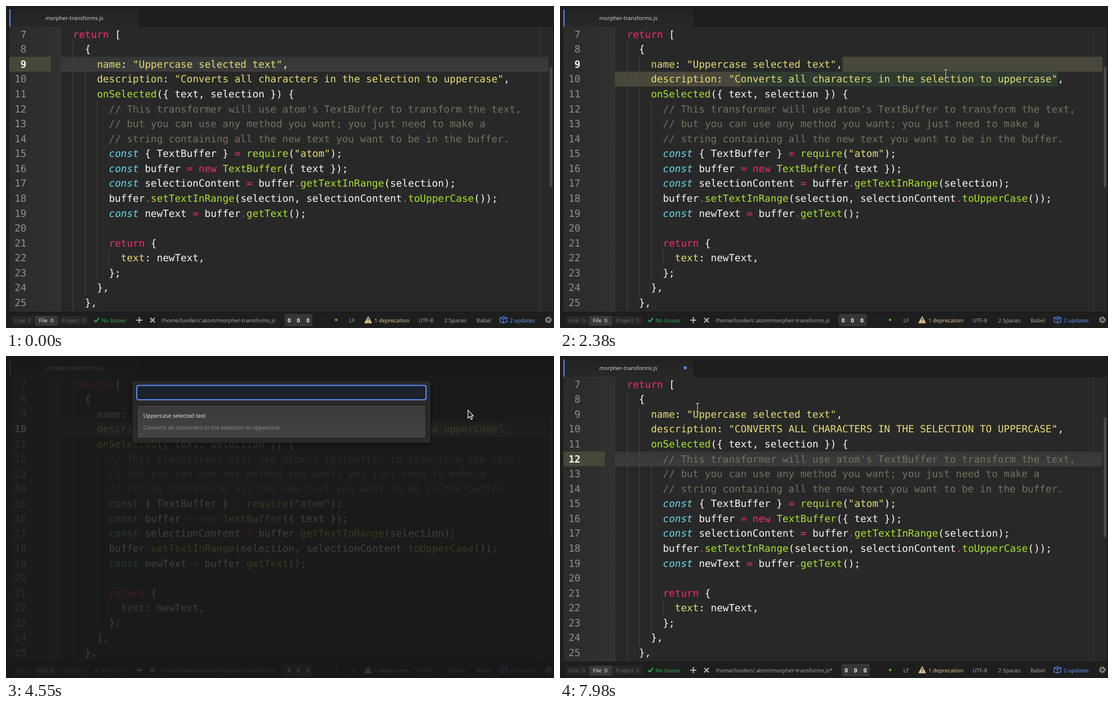
An HTML page with a canvas for the animation above (8 s loop, 976 by 574 pixels).

```html
<!DOCTYPE html>
<html lang="en">
<head>
<meta charset="utf-8">
<title>Editor transform</title>
<style>
  html, body { margin: 0; width: 100%; height: 100%; overflow: hidden; background: #1e1e1e; }
  canvas { display: block; }
</style>
</head>
<body>
<canvas id="stage" width="976" height="574"></canvas>
<script>
const ctx = document.getElementById('stage').getContext('2d');
const LOOP = 8000, STEP = 70;
const LEFT = 98, RIGHT = 966, TOP = 37.3, ROW = 26.57, COL = 10.656, FIRST = 7;
const MONO = '"DejaVu Sans Mono", monospace', SANS = '"Noto Sans", sans-serif';
const BLUE = '#568af2', SELECTION = '#49483a';
const DRAG = 1610, OPEN = 4130, CLOSE = 5180, MODIFIED = 5530, CLICK = 7070;
const ANCHOR = 21;

const code = `  return [
    {
      name: "Uppercase selected text",
      description: "Converts all characters in the selection to uppercase",
      onSelected({ text, selection }) {
        // This transformer will use atom's TextBuffer to transform the text,
        // but you can use any method you want; you just need to make a
        // string containing all the new text you want to be in the buffer.
        const { TextBuffer } = require("atom");
        const buffer = new TextBuffer({ text });
        const selectionContent = buffer.getTextInRange(selection);
        buffer.setTextInRange(selection, selectionContent.toUpperCase());
        const newText = buffer.getText();

        return {
          text: newText,
        };
      },
    },`.split('\n');

const syntax = /(\/\/.*)|("[^"]*")|\b(const)\b|(\b(?:return|new)\b|=|\.(?=\w))|(\w+(?=\())|(\w+(?=:))/g;
const palette = ['#f8f8f2', '#75715e', '#e6db74', '#66d9ef', '#f92672', '#a6e22e', '#e6db74'];

// Pointer keys: time, x, y
const path = [
  [280, 262, 4], [420, 284, 90], [630, 345, 215], [770, 384, 250], [910, 345, 175], [1050, 317, 132],
  [1260, 317, 132], [1330, 317, 131], [1540, 317, 131], [1610, 320, 131], [1680, 339, 128],
  [2030, 520, 113], [2240, 640, 112], [2310, 664, 116], [2380, 687, 121], [2730, 790, 130],
  [3220, 872, 136], [4060, 872, 136], [4550, 822, 96], [5880, 822, 96], [6090, 883, 125],
  [6230, 883, 126], [6510, 883, 126], [6580, 849, 139], [6720, 798, 173], [6790, 798, 173],
  [6860, 798, 188], [7070, 798, 188], [7420, 682, 311], [7490, 682, 311], [7770, 300, 160],
  [7910, 223, 90], [7980, 245, 92]
];

function pointerAt(t) {
  const next = path.findIndex(key => key[0] >= t);
  if (next < 1) return path[next < 0 ? path.length - 1 : 0].slice(1);
  const [t0, x0, y0] = path[next - 1], [t1, x1, y1] = path[next];
  const k = (t - t0) / (t1 - t0);
  return [x0 + (x1 - x0) * k, y0 + (y1 - y0) * k];
}

const rowTop = line => TOP + (line - FIRST) * ROW;
const colX = col => LEFT + col * COL;

function rect(x, y, w, h, fill) {
  ctx.fillStyle = fill;
  ctx.fillRect(x, y, w, h);
}

function box(x, y, w, h, radius, fill, stroke, weight = 1) {
  ctx.beginPath();
  ctx.roundRect(x, y, w, h, radius);
  ctx.fillStyle = fill;
  ctx.fill();
  if (!stroke) return;
  ctx.strokeStyle = stroke;
  ctx.lineWidth = weight;
  ctx.stroke();
}

function gradient(x0, y0, x1, y1, from, to) {
  const g = ctx.createLinearGradient(x0, y0, x1, y1);
  g.addColorStop(0, from);
  g.addColorStop(1, to);
  return g;
}

function text(str, x, y, fill, font = '9.7px ' + SANS) {
  ctx.font = font;
  ctx.fillStyle = fill;
  ctx.fillText(str, x, y);
}

function line(d, stroke, weight, fill) {
  const shape = new Path2D(d);
  if (fill) { ctx.fillStyle = fill; ctx.fill(shape); }
  ctx.strokeStyle = stroke;
  ctx.lineWidth = weight;
  ctx.stroke(shape);
}

function dot(x, y, r, fill) {
  ctx.beginPath();
  ctx.arc(x, y, r, 0, 7);
  ctx.fillStyle = fill;
  ctx.fill();
}

// Active line and selection spans [line, x0, x1]
function editorState(t) {
  if (t < DRAG) return { active: 9, caretLine: true, spans: [] };
  if (t >= CLICK) return { active: 12, caretLine: true, spans: [], caret: t < 7420 ? 66 : 0 };
  if (t >= CLOSE) return { active: 10, spans: [[10, LEFT, RIGHT]] };
  const [x, y] = pointerAt(Math.min(t, 3290) - STEP);
  if (y < rowTop(10)) return { active: 9, inString: true, spans: [[9, colX(38), RIGHT], [10, LEFT, colX(ANCHOR)]] };
  const col = Math.round((x - LEFT) / COL);
  const empty = col === ANCHOR;
  return {
    active: 10, inString: true, caretLine: empty, rowLit: !empty, caret: empty ? ANCHOR : 0,
    spans: empty ? [] : [[10, colX(ANCHOR), colX(col)]]
  };
}

function drawLine(str, y) {
  let pos = 0;
  const put = (part, kind) => {
    text(part, colX(pos), y, palette[kind], (kind === 3 ? 'italic ' : '') + '17.7px ' + MONO);
    pos += part.length;
  };
  for (const match of str.matchAll(syntax)) {
    if (match.index > pos) put(str.slice(pos, match.index), 0);
    put(match[0], match.findIndex((group, i) => i && group));
  }
  if (pos < str.length) put(str.slice(pos), 0);
}

function drawTabs(t) {
  rect(0, 0, 976, 37, '#1e1e1e');
  rect(6, 5, 233, 32, gradient(0, 5, 0, 37, '#222222', '#282828'));
  rect(6, 6, 2, 31, BLUE);
  rect(238, 6, 1, 31, '#161616');
  rect(239, 36, 737, 1, '#171717');
  text('morpher-transforms.js', 70, 24.6, '#d2d2d2');
  if (t >= MODIFIED) dot(223, 21, 2.8, BLUE);
}

function drawEditor(t) {
  const state = editorState(t);
  rect(0, 37, 976, 509, '#1e1e1e');
  rect(6, 37, 968, 508, '#282828');
  rect(6, 37, 92, 508, gradient(6, 0, 98, 0, '#2b2b2a', '#313130'));
  rect(97, 37, 1, 508, '#3a3a39');

  const top = rowTop(state.active);
  if (state.caretLine) rect(6, top, 74, ROW, '#47473a');
  if (state.caretLine || state.rowLit)
    rect(LEFT, top, RIGHT - LEFT, ROW, gradient(0, top, 0, top + ROW, '#363636', '#3c3c3c'));
  if (state.inString) rect(colX(19), rowTop(10), 55 * COL, ROW, 'rgba(62,96,68,.35)');
  for (const [row, x0, x1] of state.spans) rect(x0, rowTop(row), x1 - x0, ROW, SELECTION);

  // Indent guides: column, first line, last line
  for (const [col, from, to] of [[2, 8, 25], [4, 9, 24], [6, 12, 23], [8, 22, 22]])
    rect(Math.round(colX(col)), rowTop(from), 1, Math.min(545, rowTop(to + 1)) - rowTop(from), '#444444');
  rect(950, 37, 1, 508, '#3b3b3b');

  code.forEach((str, i) => {
    const number = FIRST + i, y = rowTop(number) + 19.4, active = number === state.active;
    ctx.textAlign = 'right';
    text(number, 36.5, y, active ? '#f4f4ee' : '#8f908a', (active ? 'bold ' : '') + '17.7px ' + MONO);
    ctx.textAlign = 'left';
    if (number === 10 && t >= CLOSE) str = str.replace(/".*"/, s => s.toUpperCase());
    drawLine(str, y);
  });

  if (state.caret) rect(colX(state.caret) - 0.8, top, 1.6, ROW, '#f8f8f0');
  box(968.5, 109, 4.5, 214, 2, '#4a4a4a');
}

function drawStatus(t) {
  const grey = '#a3a3a3', dim = '#666666', green = '#2bb04c', amber = '#e2c08d', y = 563.6;
  rect(0, 545, 976, 29, '#1e1e1e');
  rect(0, 545, 976, 1, '#171717');
  box(8.5, 551.5, 140, 18, 2, '#262626', '#171717');
  rect(52, 552, 40, 18, '#393939');
  text('Line  0', 15, y, dim);
  text('File  0', 58.5, y, '#e6e6e6');
  text('Project  0', 99, y, dim);
  line('M157 560l3 3l6 -7', green, 2);
  text('No Issues', 170, y, green);
  line('M232 560h11M237.500 554.500v11', '#b5b5b5', 2);
  line('M257 556l8 8m0 -8l-8 8', '#b2b9c6', 2);

  const modified = t >= MODIFIED, shift = modified ? 5.5 : 0;
  text('/home/lunderi/.atom/morpher-transforms.js' + (modified ? '*' : ''), 277, y, grey);
  box(496 + shift, 549, 50, 22, 3, '#363636');
  for (const x of [501.500, 518, 535]) text('0', x + shift, y, '#f2f2f2', 'bold 10px ' + SANS);

  line('M588 557l2.500 2.500l-2.500 2.500l-2.500 -2.500z', '#4f9a1c', 0.5, '#5fb522');
  text('LF', 611.5, y, grey);
  line('M645 554.500l5.500 10h-11z', amber, 1.8, amber);
  rect(644.3, 556.5, 1.5, 4, '#1e1e1e');
  rect(644.3, 561.7, 1.5, 1.5, '#1e1e1e');
  text('1 deprecation', 656, y, amber);
  text('UTF-8', 735, y, grey);
  text('2 Spaces', 780.5, y, grey);
  text('Babel', 838, y, grey);
  line('M880 556l6 -2l6 2v7l-6 2l-6 -2zl6 2l6 -2m-6 2v7', BLUE, 1.3);
  text('2 updates', 897, y, '#6494ed');

  ctx.setLineDash([2.2, 1.73]);
  ctx.beginPath();
  ctx.arc(966, 559.5, 5, 0, 2 * Math.PI);
  ctx.strokeStyle = '#858585';
  ctx.lineWidth = 2.4;
  ctx.stroke();
  ctx.setLineDash([]);
  ctx.beginPath();
  ctx.arc(966, 559.5, 3.4, 0, 7);
  ctx.lineWidth = 2.2;
  ctx.stroke();
}

function drawDialog(t) {
  const fade = 1 - Math.pow(1 - Math.min(1, (t - OPEN + STEP) / 280), 3);
  rect(0, 0, 976, 574, `rgba(24,24,24,${0.82 * fade})`);
  ctx.shadowColor = 'rgba(0,0,0,.55)';
  ctx.shadowBlur = 10;
  ctx.shadowOffsetY = 3;
  box(225, 45, 531, 110, 4, '#292929');
  ctx.shadowColor = 'transparent';
  box(233, 52.5, 515, 25.5, 3, '#1c212b', BLUE, 2);
  box(233.5, 87.5, 514, 59, 1, gradient(0, 88, 0, 146, '#3a3a3a', '#434343'), '#191919');
  text('Uppercase selected text', 244.5, 109.7, '#e0e0e0', '9.95px ' + SANS);
  text('Converts all characters in the selection to uppercase', 244.5, 131, '#8c8c8c', '9.95px ' + SANS);
}

function drawPointer(t) {
  if (t < path[0][0]) return;
  const [x, y] = pointerAt(t);
  ctx.save();
  ctx.translate(x, y);
  if (t >= OPEN && t < 5950) {
    line('M.7 .7v14l3.300 -3l2.300 5.200l2.400 -1l-2.300 -5.100h4.200z', '#f4f4f4', 1.2, '#111111');
  } else {
    const beam = 'M-3 -7.500h2l1 1l1 -1h2M0 -6.500v13M-3 7.500h2l1 -1l1 1h2';
    line(beam, '#151515', 2.6);
    line(beam, '#eeeeee', 1.1);
  }
  ctx.restore();
}

function draw(now) {
  const t = Math.floor(now % LOOP / STEP) * STEP;
  ctx.textRendering = 'geometricPrecision';
  drawTabs(t);
  drawEditor(t);
  drawStatus(t);
  if (t >= OPEN && t < CLOSE) drawDialog(t);
  drawPointer(t);
  requestAnimationFrame(() => draw(performance.now()));
}
draw(performance.now());
</script>
</body>
</html>
```
